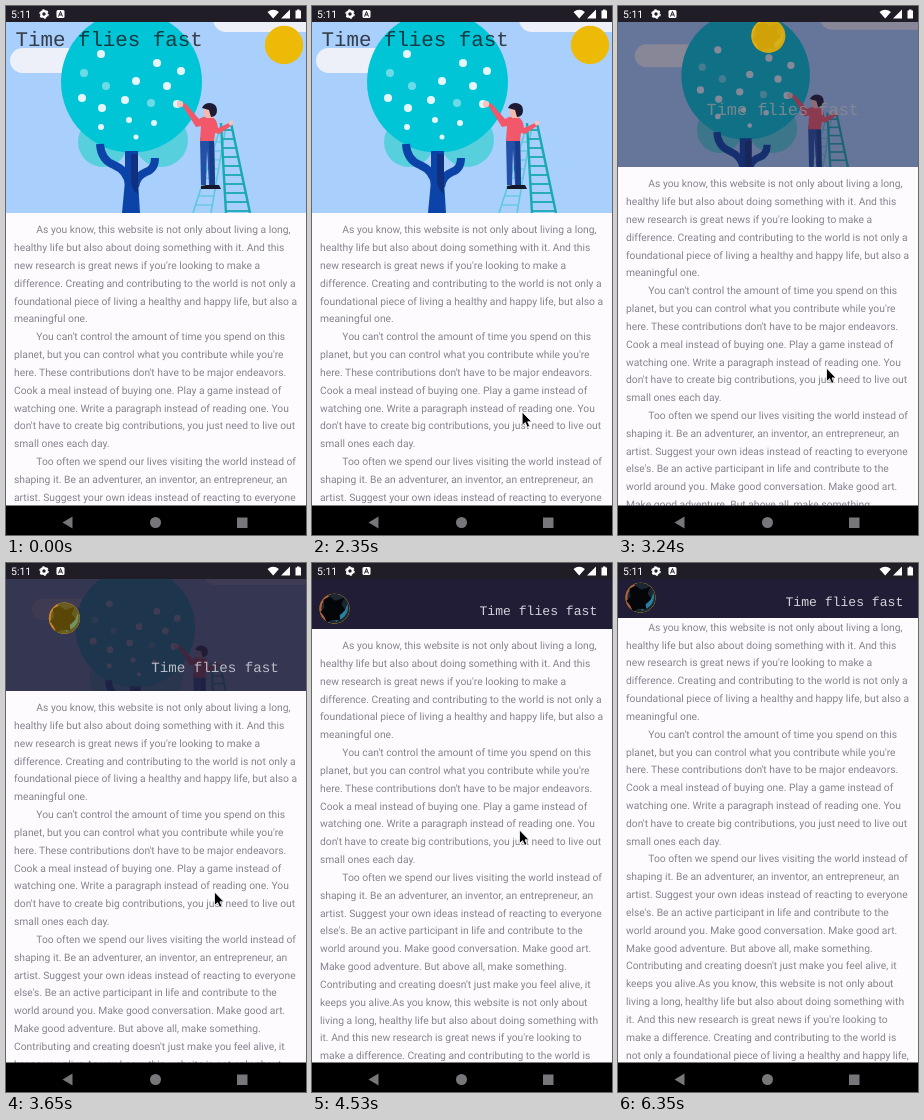
Animation of 300 by 529 pixels, one loop 6.65 s. Source, as an HTML page:

```html
<!DOCTYPE html>
<html lang="en">
<head>
<meta charset="utf-8">
<title>Collapsing header</title>
<style>
html, body { margin: 0; width: 100%; height: 100%; overflow: hidden; background: #fefbff; }
svg { display: block; width: 100vw; height: 100vh; }
text { white-space: pre; text-rendering: geometricPrecision; }
#article { font: 10.31px Roboto, sans-serif; fill: #85838d; }
#title { font: 20.8px "Liberation Mono", "Courier New", monospace; fill-opacity: .82; }
.clock { font: 10.5px Roboto, sans-serif; fill: #fff; }
</style>
</head>
<body>
<svg viewBox="0 0 300 529" preserveAspectRatio="none">
  <defs>
    <clipPath id="headerClip"><rect id="clipRect" width="300" height="207"/></clipPath>
    <clipPath id="round"><circle r="15"/></clipPath>
  </defs>
  <rect width="300" height="529" fill="#fefbff"/>
  <g id="article"></g>

  <g clip-path="url(#headerClip)">
    <rect width="300" height="207" fill="#221d36"/>
    <g id="picture">
      <rect width="300" height="207" fill="#a9cffd"/>
      <g id="scene">
        <g fill="#edf0f9">
          <rect x="4" y="42" width="80" height="25" rx="12.5"/>
          <rect x="207" y="0" width="130" height="26" rx="13"/>
        </g>
        <g fill="#57cfdd"><circle cx="97" cy="136" r="25"/><circle cx="155" cy="134" r="27"/></g>
        <circle cx="125.5" cy="76" r="70.5" fill="#00c5d6"/>
        <g fill="none" stroke="#0b43a8" stroke-width="8">
          <path d="M94 138q1 16 14 21 14 6 15 20"/>
          <path d="M149 152q0 11-9 14-10 4-11 15"/>
        </g>
        <path d="M116 207l3-32V145h13v30l2 32z" fill="#0b43a8"/>
        <path d="M125 148h7v40q-6-3-7-14z" fill="#102f7d"/>
        <g id="fruit"></g>
        <g id="ladder" fill="none"></g>
        <path d="M194 132h14l1 47h-6l-2-35-1 35h-5z" fill="#2450a8"/>
        <path d="M203 133h5l1 46h-5z" fill="#193c8a"/>
        <path d="M195 183v-3l5-1h13l2 4z" fill="#17182b"/>
        <path d="M176 99l3-2 14 16q6-4 13-2 5 2 6 11l11-5 2 3-12 8-4-1-1 8h-14l1-15-5 1z" fill="#f3576a"/>
        <g fill="#f6c4bc"><circle cx="174" cy="98" r="3.2"/><circle cx="225" cy="117" r="2.4"/></g>
        <path d="M198 103h9v9h-7q-3-3-2-9z" fill="#f5b9ae"/>
        <path d="M196 102q2-5 8-5 7 1 7 7 0 7-6 7l-2-7z" fill="#1d1b33"/>
      </g>
    </g>
    <g id="badge">
      <circle r="15" fill="#eeba08"/>
      <g id="avatar" clip-path="url(#round)">
        <circle r="15" fill="#1b2733"/>
        <path d="M-6-13q-9 5-8 14 1 7 6 11" fill="none" stroke="#b5623c" stroke-width="2"/>
        <path d="M13-5q3 12-11 18l-3-3q11-4 14-15z" fill="#287f9e"/>
        <path d="M-11-9l6-3 6 4 9-3-3 7 4 5-6 5 1 6-8-1-6 3-2-6-4-5 4-4z" fill="#050609"/>
      </g>
    </g>
    <text id="title">Time flies fast</text>
  </g>

  <rect width="300" height="16" fill="#201d27"/>
  <text class="clock" x="5" y="12">5:11</text>
  <g fill="#fff">
    <circle cx="38" cy="8" r="2.8" fill="none" stroke="#fff" stroke-width="2.2"/>
    <circle cx="38" cy="8" r="4.2" fill="none" stroke="#fff" stroke-width="1.2" stroke-dasharray="2.2"/>
    <rect x="50.5" y="4" width="8" height="8" rx="1.5"/>
    <path d="M52.5 10.5l2-5 2 5m-3.2-1.6h2.4" fill="none" stroke="#201d27"/>
    <path d="M261.5 6q5.7-4.5 11.4 0L267.2 12.5zM284 3.5v9h-9z"/>
    <path d="M289.5 4.5h1.5v-1h2.5v1h1.5v8h-5.5z"/>
  </g>
  <rect y="499.5" width="300" height="29.5"/>
  <g fill="#77777b">
    <path d="M56.5 516.5l10-6v12z"/>
    <circle cx="149.5" cy="516.5" r="5.5"/>
    <rect x="231" y="511.5" width="10.5" height="10.5"/>
  </g>
  <path id="cursor" d="M0 0V13.5L3.1 10.7 5.2 15.4 7.5 14.300 5.500 9.900H9.500z" stroke="#fff" stroke-width=".8"/>
</svg>
<script>
const LOOP = 6650, HEADER = 207, TOOLBAR = 55, LINE = 17.83;
const $ = id => document.getElementById(id);
const clamp = v => Math.min(1, Math.max(0, v));
const mix = (a, b, k) => a + (b - a) * k;

// Piecewise linear value through [position, value] points.
function track(points, x) {
  const i = points.findIndex(p => p[0] > x);
  if (i === 0) return points[0][1];
  if (i < 0) return points[points.length - 1][1];
  const [a, b] = [points[i - 1], points[i]];
  return mix(a[1], b[1], (x - a[0]) / (b[0] - a[0]));
}

function add(parent, tag, attrs, text = "") {
  const el = document.createElementNS("http://www.w3.org/2000/svg", tag);
  for (const name in attrs) el.setAttribute(name, attrs[name]);
  el.textContent = text;
  parent.append(el);
}

// A leading ">" marks an indented paragraph start.
`>As you know, this website is not only about living a long,
healthy life but also about doing something with it. And this
new research is great news if you're looking to make a
difference. Creating and contributing to the world is not only a
foundational piece of living a healthy and happy life, but also a
meaningful one.
>You can't control the amount of time you spend on this
planet, but you can control what you contribute while you're
here. These contributions don't have to be major endeavors.
Cook a meal instead of buying one. Play a game instead of
watching one. Write a paragraph instead of reading one. You
don't have to create big contributions, you just need to live out
small ones each day.
>Too often we spend our lives visiting the world instead of
shaping it. Be an adventurer, an inventor, an entrepreneur, an
artist. Suggest your own ideas instead of reacting to everyone
else's. Be an active participant in life and contribute to the
world around you. Make good conversation. Make good art.
Make good adventure. But above all, make something.
Contributing and creating doesn't just make you feel alive, it
keeps you alive.As you know, this website is not only about
living a long, healthy life but also about doing something with
it. And this new research is great news if you're looking to
make a difference. Creating and contributing to the world is
not only a foundational piece of living a healthy and happy life,
but also a meaningful one.`.split("\n").forEach((line, i) => {
  const indent = line[0] === ">";
  add($("article"), "text", { x: indent ? 30.3 : 8, y: 227.2 + i * LINE }, indent ? line.slice(1) : line);
});

const fruit = (color, places) => places.forEach(([cx, cy, r = 4]) =>
  add($("fruit"), "circle", { cx, cy, r, fill: color }));
fruit("#e4f5fb", [[95, 48], [151, 57], [130, 75], [76, 92], [161, 80], [175, 65],
  [96, 102], [119, 94], [171, 98], [95, 121, 3], [148, 117, 3], [130, 131, 2.5], [123, 114, 3]]);
fruit("#6cdbe8", [[78, 67], [100, 80], [145, 97]]);

const rail = (d, stroke, width) => add($("ladder"), "path", { d, stroke, "stroke-width": width });

// Draws a ladder between top and bottom pairs of rail positions.
function ladder(top, left, right, color, width) {
  rail(`M${left[0]} ${top}L${left[1]} 207M${right[0]} ${top}L${right[1]} 207`, color, width);
  for (let y = top + 7; y < 207; y += 9) {
    const k = (y - top) / (207 - top);
    rail(`M${mix(...left, k)} ${y}H${mix(...right, k)}`, color, width * 0.75);
  }
}
ladder(120, [215, 187], [220, 205], "#5cc9dc", 1.6);
ladder(117, [215, 220], [225, 244], "#19a9b0", 2.4);

const scrollTrack = [[2450, 0], [2820, 12], [3650, 79], [4530, 141], [4940, 154.5], [5180, 158.7], [5350, 159.5]];
const cursorX = [[1100, 302], [1470, 218], [2120, 214], [2450, 208.5], [3650, 208.5], [4530, 207.5], [5180, 206.5]];
const cursorY = [[1100, 425], [1470, 397.5], [2120, 401], [2450, 408]];
// Distances above the header's bottom edge, by scroll offset.
const titleLift = [[0, 174], [12, 134], [30, 88], [50, 50], [79, 24], [92, 20], [141, 18], [153, 16]];
const badgeLift = [[0, 168], [12, 166], [30, 152], [50, 126], [79, 73], [92, 20.3]];

function draw(t) {
  const scroll = track(scrollTrack, t);
  const height = Math.max(TOOLBAR, HEADER - scroll);
  const q = clamp(scroll / 92);
  const place = (id, value) => $(id).setAttribute("transform", value);

  place("article", `translate(0 ${-scroll})`);
  $("clipRect").setAttribute("height", height);
  $("picture").setAttribute("opacity", 1 - q);
  const zoom = 1 - 0.175 * q;
  place("scene", `translate(${150 * (1 - zoom)} 0) scale(${zoom})`);

  const size = mix(1, 0.629, q);
  const baseline = height - track(titleLift, scroll) + 6.7 * size;
  place("title", `translate(${mix(9.5, 167.5, q)} ${baseline}) scale(${size})`);
  const shade = mix(28, 250, q);
  $("title").setAttribute("fill", `rgb(${shade},${shade},${shade + 5})`);

  place("badge", `translate(${mix(278, 22.5, q)} ${height - track(badgeLift, scroll)}) scale(${mix(1.28, 1, q)})`);
  $("avatar").setAttribute("opacity", q ** 3);

  place("cursor", `translate(${track(cursorX, t)} ${track(cursorY, t) - Math.min(scroll, 154)})`);
  $("cursor").setAttribute("visibility", t >= 1100 && t < 5650 ? "visible" : "hidden");
}

function tick() {
  draw(performance.now() % LOOP);
  requestAnimationFrame(tick);
}
tick();
</script>
</body>
</html>
```
